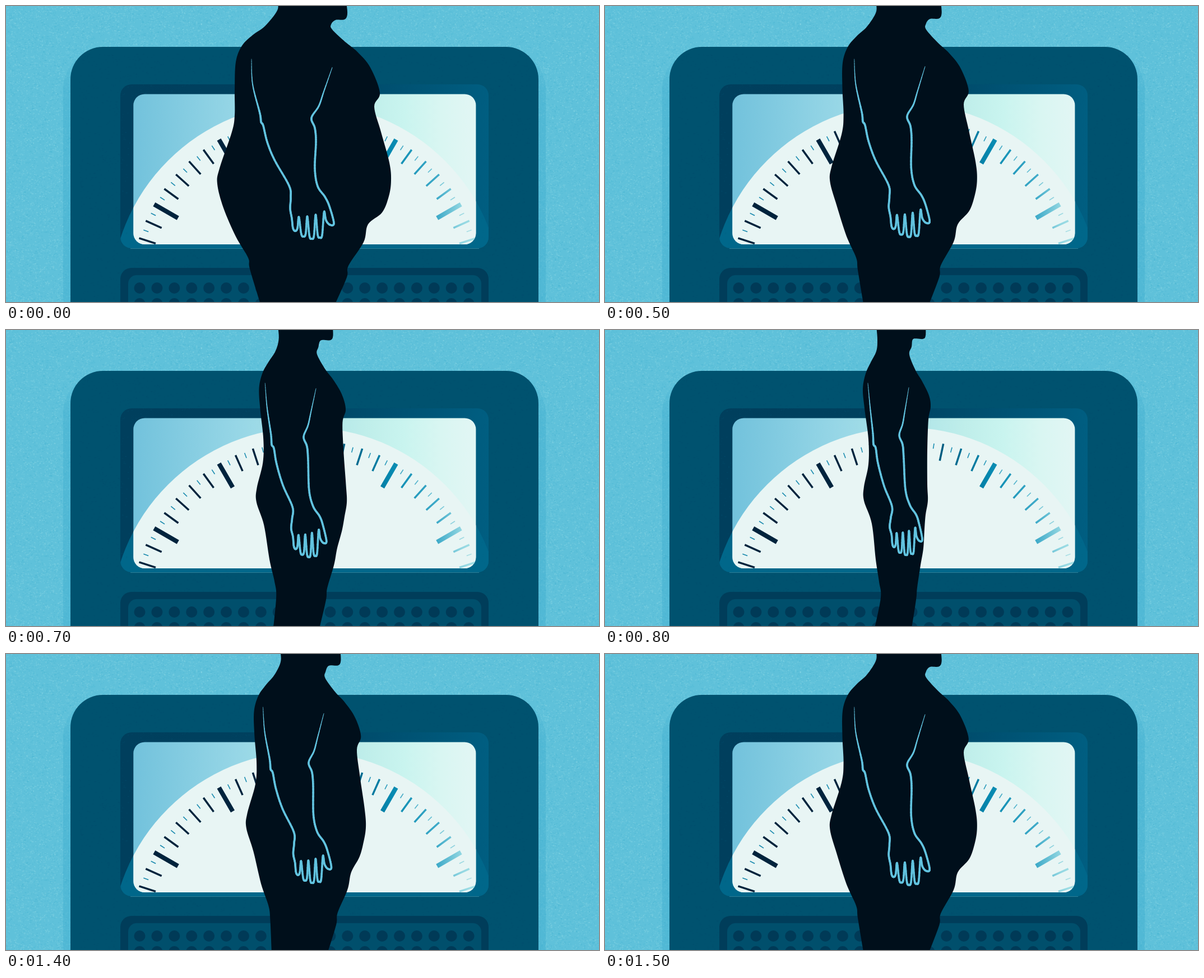
These frames come from a looping animation (1058 by 529 pixels, 1.6 s). An HTML page with a canvas:

```html
<!DOCTYPE html>
<html lang="en">
<head>
<meta charset="utf-8">
<title>Figure on a scale</title>
<style>
  html, body { margin: 0; width: 100%; height: 100%; overflow: hidden; background: #5fc2db; }
  canvas { display: block; width: 100%; height: 100%; }
</style>
</head>
<body>
<canvas id="stage" width="1058" height="529"></canvas>
<script>
const W = 1058, H = 529;
const ctx = document.getElementById('stage').getContext('2d');

// Key points, top down: x, y of the heaviest pose, then x, y of the thinnest.
const back = [
  [484, -8, 484, -8], [484, 8, 486, 18], [462, 36, 484, 38], [440, 52, 474, 58], [421, 71, 465, 78],
  [410, 100, 460, 105], [408, 150, 463, 140], [408, 195, 470, 195], [403, 225, 470, 240],
  [381, 290, 462, 280], [377, 318, 462, 305], [388, 361, 476, 346], [410, 412, 483, 410],
  [432, 450, 489, 450], [435, 470, 492, 478], [454, 533, 481, 533]
];
const front = [
  [607, -8, 572, -8], [609, 14, 572, 10], [604, 24, 567, 16], [588, 25, 550, 16], [580, 33, 547, 30],
  [582, 42, 543, 44], [605, 64, 554, 72], [627, 82, 566, 92], [650, 110, 578, 117], [667, 155, 581, 137],
  [657, 180, 577, 160], [669, 225, 575, 215], [684, 280, 575, 275], [687, 312, 576, 305],
  [683, 340, 572, 330], [671, 369, 570, 355], [646, 390, 568, 390], [638, 422, 563, 420],
  [611, 464, 557, 460], [608, 485, 555, 482], [587, 533, 547, 533]
];
const outerArm = [
  [438, 95, 469, 95], [440, 140, 473, 138], [453, 192, 478, 185], [455, 207, 479, 204], [459, 214, 483, 211],
  [466, 243, 487, 238], [479, 275, 498, 279], [505, 321, 512, 315], [508, 342, 510, 335], [507, 362, 508, 352]
];
const innerArm = [
  [582, 110, 542, 103], [567, 153, 535, 145], [558, 179, 531, 168], [545, 200, 525, 188], [551, 218, 531, 205],
  [553, 243, 533, 230], [551, 290, 536, 285], [556, 322, 544, 313], [569, 341, 555, 330], [577, 358, 560, 345]
];

// Four fingers with the gaps after them, then the thumb.
function handPoints() {
  const points = [[510, 380]];
  for (let i = 0; i < 4; i++) {
    const x = 516 + 14.7 * i, tip = 402 + 13 * i - 3 * i * i;
    points.push([x - 4, tip - 5], [x, tip], [x + 4, tip - 5], [522.5 + 15 * i, 377 - i * i]);
  }
  points.push([571, 383], [578, 391], [585, 388]);
  return points.map(([x, y]) => [x, y, 139 + 0.73 * x, y - 14]);
}
const arm = [...outerArm, ...handPoints(), ...innerArm.reverse()];

// How thin each part is, from 0 to 1, and a sideways shift.
const poses = [
  { back: 0, front: 0, arm: 0, shift: 0 },
  { back: 0.3, front: 0.2, arm: 0.25, shift: -1 },
  { back: 0.55, front: 0.45, arm: 0.5, shift: 5 },
  { back: 0.81, front: 0.72, arm: 0.75, shift: 1 },
  { back: 1, front: 1, arm: 1, shift: 0 }
];

const blend = (keys, t, shift) => keys.map(([x0, y0, x1, y1]) => [x0 + (x1 - x0) * t + shift, y0 + (y1 - y0) * t]);

// Points along a Catmull-Rom spline.
function spline(points, steps = 8) {
  const result = [];
  for (let i = 0; i < points.length - 1; i++) {
    const a = points[Math.max(i - 1, 0)], b = points[i], c = points[i + 1];
    const d = points[Math.min(i + 2, points.length - 1)];
    for (let s = 0; s < steps; s++) {
      const t = s / steps;
      result.push([0, 1].map(k => b[k] + t / 2 * (c[k] - a[k] +
        t * (2 * a[k] - 5 * b[k] + 4 * c[k] - d[k] + t * (3 * (b[k] - c[k]) + d[k] - a[k])))));
    }
  }
  result.push(points[points.length - 1]);
  return result;
}

function drawFigure(pose) {
  const curve = (keys, t) => spline(blend(keys, t, pose.shift));

  ctx.beginPath();
  [...curve(back, pose.back), ...curve(front, pose.front).reverse()].forEach(p => ctx.lineTo(...p));
  ctx.fillStyle = '#000f1b';
  ctx.fill();

  // The arm line tapers off towards the shoulder.
  const line = curve(arm, pose.arm);
  ctx.strokeStyle = '#62c3df';
  ctx.lineCap = 'round';
  for (let i = 1; i < line.length; i++) {
    ctx.lineWidth = Math.min(3.6, 0.6 + Math.max(0, line[i][1] - 95) / 35);
    ctx.beginPath();
    ctx.moveTo(...line[i - 1]);
    ctx.lineTo(...line[i]);
    ctx.stroke();
  }
}

function drawScenery() {
  const canvas = document.createElement('canvas');
  canvas.width = W;
  canvas.height = H;
  const g = canvas.getContext('2d');
  let seed = 7;
  const random = () => (seed = seed * 16807 % 2147483647) / 2147483647;

  const grain = (count, x, y, w, h, color) => {
    g.fillStyle = color;
    for (let i = 0; i < count; i++) g.fillRect(x + random() * w, y + random() * h, 1 + random() * 2, 1 + random());
  };
  const gradient = (x0, y0, x1, y1, stops) => {
    const fill = g.createLinearGradient(x0, y0, x1, y1);
    stops.forEach(([at, color]) => fill.addColorStop(at, color));
    return fill;
  };
  const box = (x0, y0, x1, y1, radius, fill) => {
    g.beginPath();
    g.roundRect(x0, y0, x1 - x0, y1 - y0, radius);
    g.fillStyle = fill;
    g.fill();
  };
  const disc = (x, y, r, fill) => {
    g.beginPath();
    g.arc(x, y, r, 0, 2 * Math.PI);
    g.fillStyle = fill;
    g.fill();
  };

  g.fillStyle = '#5fc1da';
  g.fillRect(0, 0, W, H);
  grain(28000, 0, 0, W, H, 'rgba(190,238,240,.15)');
  grain(18000, 0, 0, W, H, 'rgba(40,160,200,.14)');

  box(102, 76, 963, 600, 72, gradient(0, 85, 0, 150, [[0, 'rgba(60,172,206,0)'], [1, 'rgba(60,172,206,.4)']]));
  box(115, 73, 950, 600, 58, '#00526f');
  grain(5000, 130, 85, 805, 444, 'rgba(0,70,105,.16)');

  // Recess around the window, with the dial continuing faintly into it.
  const dial = fill => disc(536, 523, 349, fill);
  g.save();
  box(204, 140, 861, 433, 20, gradient(204, 0, 861, 0, [[0, '#003f5d'], [0.45, '#00415f'], [1, '#005e81']]));
  g.clip();
  dial('#00678a');
  grain(1500, 204, 140, 657, 293, 'rgba(0,95,130,.18)');
  g.restore();
  g.fillStyle = 'rgba(110,190,205,.5)';
  g.fillRect(222, 433, 622, 0.8);

  const acrossWindow = stops => gradient(227, 0, 838, 0, stops);
  g.save();
  box(227.3, 157.5, 838.4, 426, 20, acrossWindow(
    [[0, '#72c2dc'], [0.3, '#96d6e6'], [0.68, '#bfeeea'], [0.79, '#c9f4ef'], [0.9, '#d9f6f2'], [1, '#e2f6f4']]));
  g.clip();
  dial('#e8f5f4');

  const tickInk = acrossWindow([[0, '#00233c'], [0.48, '#00243e'], [0.61, '#005c80'], [0.75, '#0588af'],
    [0.89, '#40abc9'], [0.96, '#93d7e2'], [1, '#a3e0e5']]);
  const shortInk = acrossWindow([[0, '#1687ac'], [0.69, '#1c8fb3'], [0.86, '#5dbbd1'], [1, '#b5e5e8']]);
  for (let angle = 18; angle <= 162; angle += 3) {
    const [from, to, width, ink] = angle % 30 === 0 ? [267, 316, 8, tickInk]
      : angle % 6 === 0 ? [285, 316, 3.5, tickInk] : [304, 313.5, 1.6, shortInk];
    const dx = -Math.cos(angle * Math.PI / 180), dy = -Math.sin(angle * Math.PI / 180);
    g.beginPath();
    g.moveTo(538 + from * dx, 512.5 + from * dy);
    g.lineTo(538 + to * dx, 512.5 + to * dy);
    g.lineWidth = width;
    g.strokeStyle = ink;
    g.stroke();
  }
  g.restore();

  box(204, 468, 861, 600, 20, '#003d5a');
  box(218, 481, 848, 600, 15, '#004f6c');
  for (let i = 0; i < 20; i++) {
    for (const y of [504, 532]) disc(238.5 + 30.9 * i, y, 10, '#003a57');
  }
  return canvas;
}

const scenery = drawScenery();

// Each half loop rests for 500 ms, then changes pose every 100 ms.
function frame(now) {
  const time = now % 1600;
  const step = Math.max(0, Math.floor((time % 800 - 400) / 100));
  ctx.drawImage(scenery, 0, 0);
  drawFigure(poses[time < 800 ? step : 4 - step]);
  requestAnimationFrame(frame);
}
frame(0);
</script>
</body>
</html>
```
